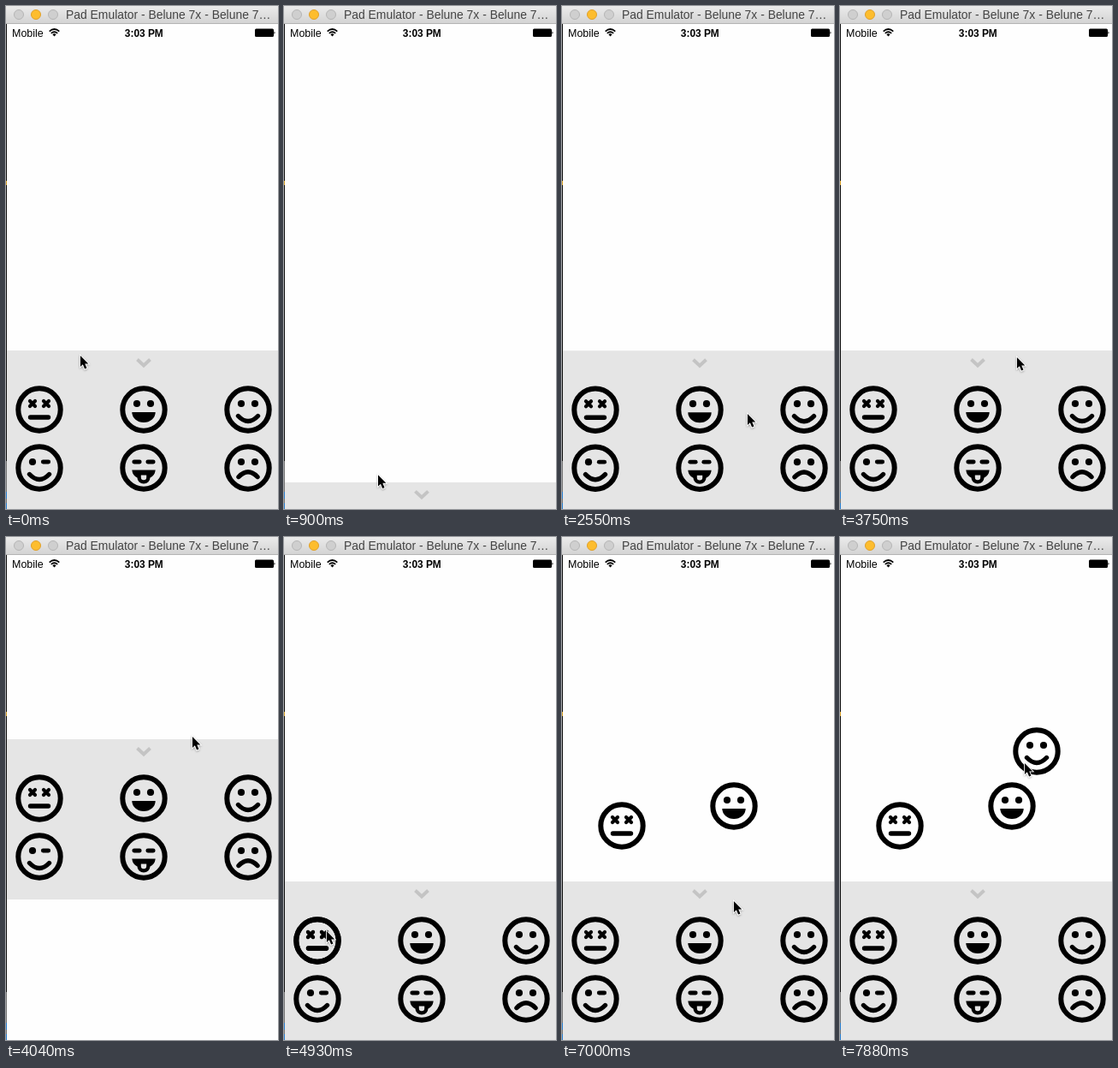
An HTML page for the animation above (8 s loop, 318 px wide and 587 px high).

```html
<!DOCTYPE html>
<html lang="en">
<head>
<meta charset="utf-8">
<title>Emoji tray</title>
<style>
  html, body { margin: 0; width: 100%; height: 100%; overflow: hidden; background: #fefefe; }
  svg { display: block; width: 100vw; height: 100vh; }
  text { font-family: "Liberation Sans", Arial, sans-serif; }
  .line { fill: none; stroke: #000; stroke-width: 5.4; stroke-linecap: round; }
</style>
</head>
<body>
<svg viewBox="0 0 318 587">
  <defs>
    <linearGradient id="bar" x2="0" y2="1">
      <stop stop-color="#ebebeb"/><stop offset="1" stop-color="#d3d3d3"/>
    </linearGradient>
    <filter id="soft" x="-50%" y="-50%" width="200%" height="200%">
      <feDropShadow dx="0" dy="1" stdDeviation="1" flood-opacity=".35"/>
    </filter>

    <circle id="ring" r="24.7" fill="none" stroke="#000" stroke-width="6"/>
    <circle id="dot" cy="-7" r="4.1"/>
    <path id="dash" class="line" d="M-3.2-7H3.2" style="stroke-width:4.8"/>
    <path id="cross" class="line" d="M-3-10L3-4M3-10L-3-4" style="stroke-width:4.2"/>
    <path id="curve" class="line" d="M-11.5 7.5Q0 19.5 11.5 7.5"/>

    <g id="dead"><use href="#ring"/><use href="#cross" x="-8"/><use href="#cross" x="8"/>
      <path class="line" d="M-10.5 9H10.5"/></g>
    <g id="grin"><use href="#ring"/><use href="#dot" x="-8"/><use href="#dot" x="8"/>
      <path d="M-13.7 3H13.7A13.7 12 0 0 1-13.7 3Z"/></g>
    <g id="smile"><use href="#ring"/><use href="#dot" x="-8"/><use href="#dot" x="8"/><use href="#curve"/></g>
    <g id="wink"><use href="#ring"/><use href="#dot" x="-8"/><use href="#dash" x="7.5"/><use href="#curve"/></g>
    <g id="tongue"><use href="#ring"/><use href="#dash" x="-8"/><use href="#dash" x="8"/>
      <path d="M-13.7 2.5H13.7Q13 9 7.5 11.5A7.5 7 0 0 1-7.5 11.5Q-13 9-13.7 2.5Z"/>
      <path d="M-3.2 8.5H3.2V11A3.2 3.2 0 0 1-3.2 11Z" fill="#e5e5e5"/></g>
    <g id="sad"><use href="#ring"/><use href="#dot" x="-8"/><use href="#dot" x="8"/>
      <path class="line" d="M-11 10.5Q0-1 11 10.5"/></g>
  </defs>

  <rect width="318" height="587" fill="#fefefe"/>

  <g id="tray">
    <rect x="1" width="317" height="187" fill="#e5e5e5"/>
    <path d="M153.5 10.5L161 17.5L168.5 10.5" fill="none" stroke="#c4c4c4" stroke-width="4"/>
    <use href="#dead" x="39" y="69"/><use href="#grin" x="161" y="69"/><use href="#smile" x="283" y="69"/>
    <use href="#wink" x="39" y="137"/><use href="#tongue" x="161" y="137"/><use href="#sad" x="283" y="137"/>
  </g>

  <use id="deadCopy" href="#dead"/>
  <use id="grinCopy" href="#grin"/>
  <use id="smileCopy" href="#smile"/>

  <!-- Window frame and status bar -->
  <rect y="20" width="1" height="511" fill="#111"/>
  <rect y="531" width="1" height="56" fill="#777"/>
  <rect y="204" width="1" height="5" fill="#d9a227"/>
  <path d="M0 567h1v8H0zM0 580h1v7H0z" fill="#2a7fd0"/>
  <rect width="318" height="20.5" fill="url(#bar)"/>
  <rect y="20" width="318" height="1" fill="#b4b4b4"/>
  <circle cx="15" cy="10" r="5.5" fill="#cfcfcf" stroke="#b6b6b6"/>
  <circle cx="35" cy="10" r="5.5" fill="#fdbd2e" stroke="#e0a02a"/>
  <circle cx="55" cy="10" r="5.5" fill="#cfcfcf" stroke="#b6b6b6"/>
  <text x="70" y="15" font-size="13.9" fill="#444">Pad Emulator - Belune 7x - Belune 7…</text>
  <text x="7" y="35.5" font-size="12.5">Mobile</text>
  <text x="161.3" y="35.5" font-size="11.9" font-weight="bold" text-anchor="middle">3:03 PM</text>
  <path d="M50.7 29.6Q56.5 24.4 62.3 29.6M52.8 31.9Q56.5 28.6 60.2 31.9" fill="none" stroke="#000" stroke-width="1.7"/>
  <path d="M54.4 33.2Q56.5 31.4 58.6 33.2L56.5 35.6Z"/>
  <rect x="291" y="26.5" width="22" height="9.5" rx="1.5"/>
  <path d="M313.5 29.5q2 1.5 0 3.5z"/>

  <g id="cursor">
    <path d="M1 1V15.2L4.2 12.3L6.6 18L9.2 16.9L6.8 11.3H11.2Z" transform="scale(.92)"
          stroke="#fff" stroke-width="1.8" paint-order="stroke" filter="url(#soft)"/>
  </g>
</svg>

<script>
const LOOP = 8000;
const TRAY_OPEN = 402, TRAY_DROP = 160, TRAY_LIFT = 166;

// Emoji copies dragged out of the tray, moving together with the cursor.
const drags = [
  { id: "deadCopy", start: 4930, end: 5520, x: 39, y: 471, dx: 31, dy: -134 },
  { id: "grinCopy", start: 5962, end: 6700, x: 161, y: 471, dx: 40, dy: -157 },
  { id: "smileCopy", start: 7290, end: 7880, x: 280, y: 448, dx: -50, dy: -198 }
];

// Every stroke shifts the cursor by (dx, dy) from where the last one left it.
const stroke = (start, end, dx, dy) => ({ start, end, dx, dy });
const strokes = [
  stroke(150, 1000, 24, 145),    // pull the tray down
  stroke(900, 1200, 107, 0),
  stroke(2000, 2167, -1, -77),   // flick it up
  stroke(2850, 3300, -10, -46),
  stroke(3600, 3750, 0, -20),
  stroke(3750, 4045, 11, -177),  // overpull
  stroke(4192, 4930, -168, 227), // reach for each emoji in turn
  stroke(5520, 5962, 80, 142),
  stroke(6700, 6995, 0, 114),
  stroke(6995, 7142, 65, 37),
  ...drags
];

const byId = id => document.getElementById(id);
const place = (id, x, y) => byId(id).setAttribute("transform", `translate(${x} ${y})`);
const progress = (t, start, end) => Math.min(1, Math.max(0, (t - start) / (end - start)));
const easeOut = u => 1 - (1 - u) ** 2;
const smooth = (t, start, end) => {
  const u = progress(t, start, end);
  return u * u * (3 - 2 * u);
};

// The screen refreshes in coarse ticks, slightly faster in the second half.
function tick(t) {
  return t < 3750
    ? Math.floor(t / 150) * 150
    : 3750 + Math.floor((t - 3742) / 147.5) * 147.5;
}

function trayTop(t) {
  const drop = smooth(t, 150, 1000) - easeOut(progress(t, 2000, 2570));
  const lift = smooth(t, 3750, 4045) - easeOut(progress(t, 4045, 4487));
  return TRAY_OPEN + TRAY_DROP * drop - TRAY_LIFT * lift;
}

function draw(now) {
  const t = tick(now % LOOP);
  place("tray", 0, trayTop(t));

  let x = 86, y = 407;
  for (const s of strokes) {
    const done = smooth(t, s.start, s.end);
    x += s.dx * done;
    y += s.dy * done;
  }
  place("cursor", x, y);

  for (const d of drags) {
    const done = smooth(t, d.start, d.end);
    byId(d.id).style.display = t < d.start ? "none" : "";
    place(d.id, d.x + d.dx * done, d.y + d.dy * done);
  }
}

const begin = performance.now();
function loop() {
  draw(performance.now() - begin);
  requestAnimationFrame(loop);
}
loop();
</script>
</body>
</html>
```
